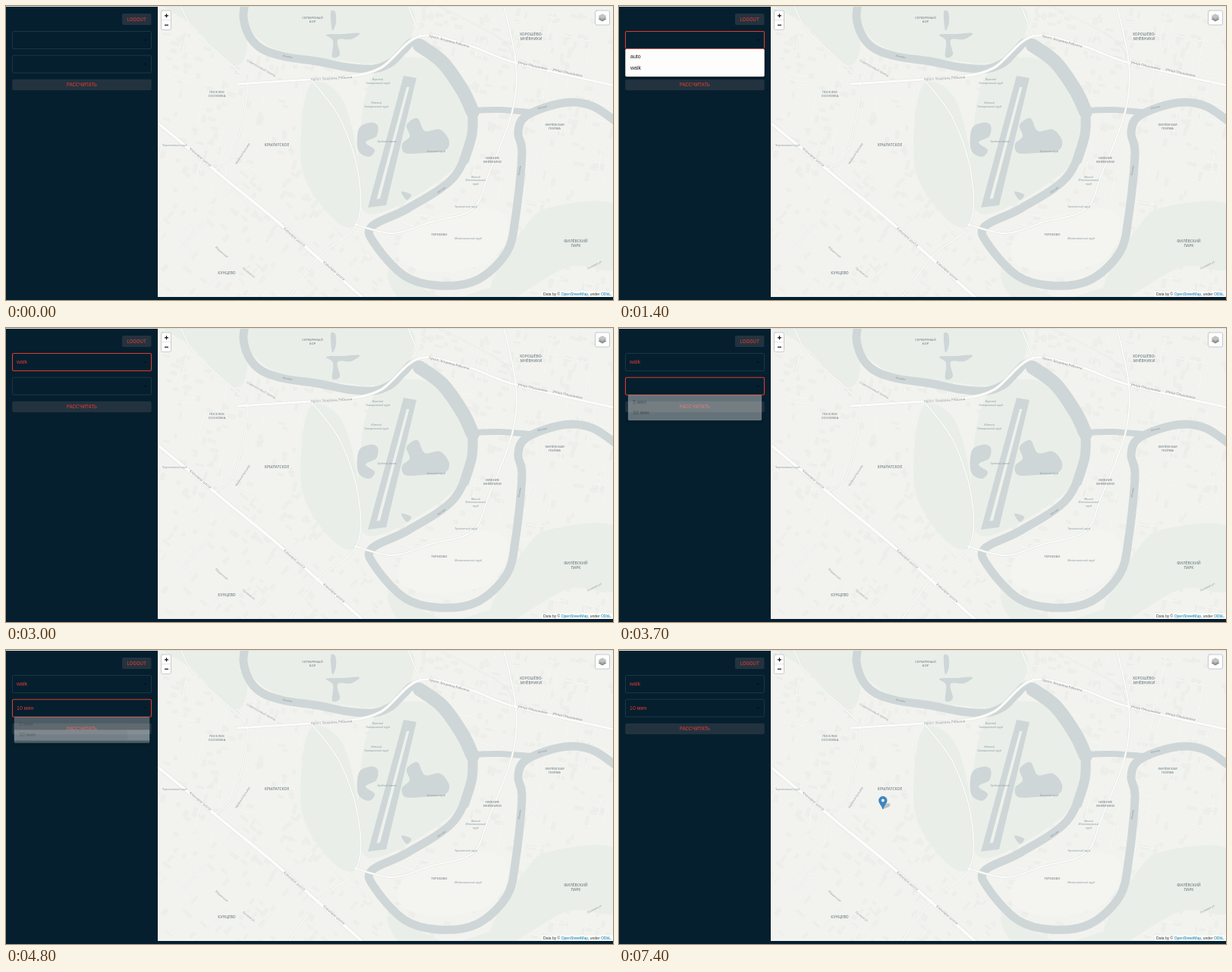
Write an HTML page with a canvas that moves like this. It is 800 by 388 pixels and loops after 8000 ms.

```html
<!DOCTYPE html>
<html lang="ru">
<head>
<meta charset="utf-8">
<title>Карта доступности</title>
<style>
html, body { margin: 0; width: 100%; height: 100%; overflow: hidden; background: #051f2e; }
canvas { display: block; width: 800px; height: 388px; }
</style>
</head>
<body>
<canvas id="stage"></canvas>
<script>
const W = 800, H = 388, LOOP = 8000, STEP = 100;
const LAND = '#f2f3ef', GREEN = '#e9efe8', WATER = '#cfd6d7', CASING = '#e0e3df', ROAD = '#fcfcfa';
const DARK = '#051f2e', RED = '#dc3a31', BUTTON = '#22333f';
const SANS = '7px "Liberation Sans", Arial, sans-serif', CAPS = '500 6px Inter, sans-serif', MAP = '"Open Sans", sans-serif';

const dpr = window.devicePixelRatio || 1;
function setup(canvas) {
  canvas.width = W * dpr;
  canvas.height = H * dpr;
  const c = canvas.getContext('2d');
  c.scale(dpr, dpr);
  return c;
}
const ctx = setup(document.getElementById('stage'));
const mapCanvas = document.createElement('canvas');
const map = setup(mapCanvas);

let seed = 11;
const rnd = () => (seed = (seed * 16807) % 2147483647) / 2147483647;
const clamp = x => Math.max(0, Math.min(1, x));

// Standard material curve, cubic-bezier(.4, 0, .2, 1)
function ease(x) {
  x = clamp(x);
  let lo = 0, hi = 1, s = 0.5;
  for (let i = 0; i < 18; i++) {
    s = (lo + hi) / 2;
    if (1.2 * s * (1 - s) ** 2 + 0.6 * s * s * (1 - s) + s ** 3 < x) lo = s; else hi = s;
  }
  return 3 * s * s * (1 - s) + s ** 3;
}

function text(c, str, x, y, font, color, align = 'left', rot = 0) {
  c.save();
  c.translate(x, y);
  c.rotate(rot * Math.PI / 180);
  c.font = font;
  c.fillStyle = color;
  c.textAlign = align;
  c.textBaseline = 'middle';
  c.fillText(str, 0, 0);
  c.restore();
}

function box(c, x, y, w, h, r, fill, line, lw = 1) {
  c.beginPath();
  c.roundRect(x, y, w, h, r);
  if (fill) { c.fillStyle = fill; c.fill(); }
  if (line) { c.strokeStyle = line; c.lineWidth = lw; c.stroke(); }
}

// ---- map ----

const points = s => s.split(' ').map(p => p.split(',').map(Number));

// Smooth curve through every point
function trace(s, closed) {
  const p = points(s), n = p.length;
  const at = i => closed ? p[(i + n) % n] : p[Math.max(0, Math.min(n - 1, i))];
  const handle = (a, b, c, k) => [0, 1].map(j => a[j] + (c[j] - b[j]) * k / 6);
  map.beginPath();
  map.moveTo(...p[0]);
  for (let i = 0; i < (closed ? n : n - 1); i++) {
    const a = at(i), b = at(i + 1);
    map.bezierCurveTo(...handle(a, at(i - 1), b, 1), ...handle(b, a, at(i + 2), -1), ...b);
  }
}
function area(s, color) {
  trace(s, true);
  map.fillStyle = color;
  map.fill();
}
function line(s, color, width) {
  trace(s);
  map.strokeStyle = color;
  map.lineWidth = width;
  map.stroke();
}
function poly(s, color) {
  map.beginPath();
  points(s).forEach(p => map.lineTo(...p));
  map.fillStyle = color;
  map.fill();
}

// Blocks and lanes follow the slant of their district
function scatter(n, paint) {
  for (let i = 0; i < n; i++) {
    const x = 200 + rnd() * 600, y = rnd() * 384;
    const slant = x > 500 ? 12 : y > 210 ? 41 : 14;
    map.save();
    map.translate(x, y);
    map.rotate((slant + (rnd() < 0.5 ? 90 : 0)) * Math.PI / 180);
    paint();
    map.restore();
  }
}
function block() {
  map.fillStyle = '#eeefeb';
  map.strokeStyle = '#e5e7e3';
  map.lineWidth = 0.4;
  map.beginPath();
  map.rect(0, 0, 4 + rnd() * 8, 2 + rnd() * 3);
  map.fill();
  map.stroke();
}
function lane() {
  const length = 25 + rnd() * 45;
  for (const [color, width] of [['#e6e8e4', 1.5], [ROAD, 0.9]]) {
    map.strokeStyle = color;
    map.lineWidth = width;
    map.beginPath();
    map.moveTo(0, 0);
    map.quadraticCurveTo(length / 2, 4, length, 0);
    map.stroke();
  }
}

function drawParks() {
  [
    '322,-5 515,-5 535,35 505,72 440,72 345,52',
    '205,-5 300,-5 318,50 300,78 245,25',
    '400,105 440,118 462,190 466,280 440,288 400,240 388,190',
    '485,90 560,72 608,150 590,215 480,275 465,200',
    '685,290 720,265 805,264 805,345 740,345 650,395 640,365',
    '505,350 580,385 640,372 620,398 530,395'
  ].forEach(s => area(s, GREEN));
  area('525,300 570,278 640,268 662,290 640,335 570,352 520,335', '#f4f4f0');
}

function drawWater() {
  const river = '316,-8 313,15 321,40 338,57 368,67 410,73 450,81 485,83 508,74 524,58 540,48 575,74 602,112 615,142';
  const bend = '615,142 614,170 590,226 530,267 482,291 486,314 525,356 570,369 620,362 660,325 672,275 680,195 675,168 682,148 710,134 745,127 775,133 806,154';
  line(river, WATER, 11);
  line('545,52 575,74 602,112 615,140', WATER, 18);
  line('615,142 614,170 604,203', WATER, 13);
  line(bend, WATER, 11);
  line('612,138 650,137 690,140', WATER, 8);

  [
    '422,38 445,37 466,36 455,44 437,45 440,64 430,67 431,46',
    '428,8 434,8 435,22 430,32',
    '465,162 480,154 490,158 488,172 474,180 486,190 478,199 464,190',
    '528,157 542,148 552,165 572,163 584,178 578,191 550,194 526,194 522,182 532,172',
    '521,245 534,249 528,256'
  ].forEach(s => area(s, WATER));

  poly('524,92 541,95 501,263 477,266', WATER);
  poly('528,107 531.5,107 493,254 488.5,255', '#eef1ec');
}

function drawRoads() {
  const roads = [
    ['196,151 290,229 350,278 412,333 480,394', 5],
    ['305,103 400,97 452,93 495,81 545,40 610,52 672,75 806,106', 4],
    ['228,-5 250,35 300,80 318,110 300,195 275,215', 2.4],
    ['402,97 440,148 464,220 462,288 412,331 368,392', 2.6],
    ['460,288 510,300 560,285 615,268 636,222 667,140 672,75 655,-5', 3],
    ['528,-5 546,40', 2.6],
    ['560,-5 650,42 672,75', 2]
  ];
  roads.forEach(([s, w]) => line(s, CASING, w));
  roads.forEach(([s, w]) => line(s, ROAD, w - 1));
}

// "|" splits a name over centred lines
function drawNames(size, color, style, names) {
  for (const [name, x, y, rot] of names) {
    name.split('|').forEach((s, i, all) =>
      text(map, s, x, y + (i - (all.length - 1) / 2) * size * 1.2, `${style} ${size}px ${MAP}`, color, 'center', rot));
  }
}

function drawLabels() {
  drawNames(4.1, '#7f8a90', '600', [
    ['СЕРЕБРЯНЫЙ|БОР', 404, 18], ['ПОСЕЛОК|СОСНОВКА', 278, 116.5], ['ТЕРЕХОВО', 571, 302],
    ['НИЖНИЕ|МНЁВНИКИ', 641, 203], ['ФИЛЁВСКАЯ|ПОЙМА', 723, 159.5]
  ]);
  drawNames(4.9, '#7b868c', '600', [
    ['ХОРОШЁВО-|МНЁВНИКИ', 692, 41], ['КРЫЛАТСКОЕ', 357, 183.5], ['КУНЦЕВО', 291, 352.5], ['ФИЛЁВСКИЙ|ПАРК', 751, 314]
  ]);
  drawNames(3.7, '#84969f', 'italic', [
    ['Верхний|Татаровский пруд', 490, 99.5], ['Южный|Татаровский пруд', 488, 130.5], ['Гребной канал', 502, 179.5],
    ['Большой пруд', 567, 192], ['Малый|Мнёвниковский|пруд', 619, 230.5], ['Тереховский пруд', 606, 265],
    ['Мнёвниковский пруд', 609, 307], ['Черепковский пруд', 222, 184.5],
    ['Москва', 371, 67, 10], ['Москва', 707, 134, -14], ['Москва', 574, 243, -36], ['Москва', 677, 217, -80]
  ]);
  drawNames(4.5, '#858b8e', '', [
    ['просп. Боцмана Рябкина', 429, 95.5, -3], ['просп. Боцмана Рябкина', 584, 46.5, 15],
    ['улица Ольшаники', 694, 79, 13], ['улица Ольшаники', 740, 88, 13],
    ['Кленовое шоссе', 256, 200, 40], ['Кленовое шоссе', 380, 305, 41], ['Кленовое шоссе', 432, 350, 41]
  ]);
  drawNames(3.8, '#92989a', '', [
    ['Старососновый проезд', 336, 82, 29], ['Хвойный бульвар', 312, 195, -57],
    ['Рощинская', 284, 325, 40], ['Луговая ул.', 320, 352, 38], ['Полевая ул.', 776, 342, -28]
  ]);
}

function drawControls() {
  box(map, 204.5, 6, 13, 25.5, 2, '#fff', '#c3c6c5', 0.9);
  map.fillStyle = '#ccc';
  map.fillRect(205, 18.5, 12, 0.5);
  map.fillStyle = '#111';
  map.fillRect(209, 12.2, 5, 1.2);
  map.fillRect(210.9, 10.3, 1.2, 5);
  map.fillRect(209, 24.6, 5, 1.2);

  box(map, 776.5, 6, 19, 19, 2, '#fff', '#bfc3c2', 0.9);
  ['#8b8e8e', '#a9acac', '#c2c4c4'].forEach((color, i) => {
    const y = 17.2 - i * 2;
    poly(`780.5,${y} 786,${y - 3} 791.5,${y} 786,${y + 3.2}`, color);
  });

  map.fillStyle = 'rgba(255,255,255,.7)';
  map.fillRect(706, 376.5, 94, 8);
  const font = SANS.replace('7px', '5px');
  let x = 708;
  ['Data by © ', 'OpenStreetMap', ', under ', 'ODbL.'].forEach((s, i) => {
    text(map, s, x, 380.6, font, i % 2 ? '#0078a8' : '#333');
    map.font = font;
    x += map.measureText(s).width;
  });
}

function drawMap() {
  map.fillStyle = LAND;
  map.fillRect(200, 0, 600, H);
  map.lineCap = map.lineJoin = 'round';
  scatter(620, block);
  scatter(150, lane);
  drawParks();
  drawWater();
  drawRoads();
  drawLabels();
  drawControls();
}

// ---- panel ----

function select(y, value, focus) {
  box(ctx, 8.5, y, 183, 23, 1.5, null, focus ? RED : '#203d4a', focus ? 1.1 : 0.8);
  text(ctx, value, 14, y + 11.7, SANS, RED);
  ctx.fillStyle = '#02121c';
  ctx.beginPath();
  ctx.moveTo(181, y + 10.5);
  ctx.lineTo(185.5, y + 10.5);
  ctx.lineTo(183.2, y + 13);
  ctx.fill();
}

function button(label, x, y, w, h) {
  box(ctx, x, y, w, h, 1.8, BUTTON);
  text(ctx, label, x + w / 2, y + h / 2 + 0.3, CAPS, RED, 'center');
}

const menus = [
  { y: 56.7, items: ['auto', 'walk'], open: 814, hover: [1900, 2300], press: 2585, close: 2700, x: 41 },
  { y: 88.3, items: ['5 мин', '10 мин'], open: 3614, hover: [Infinity, 4100], press: 4518, close: 4700, x: 43 }
];

function ripple(x, y, age) {
  ctx.save();
  ctx.beginPath();
  ctx.rect(8.3, y, 183.4, 15);
  ctx.clip();
  ctx.fillStyle = 'rgba(0,0,0,.14)';
  ctx.beginPath();
  ctx.arc(x, y + 7.3, 150 * ease(age / 550), 0, 7);
  ctx.fill();
  ctx.restore();
}

function drawMenu(t, m) {
  const alpha = ease((t - m.open - 15) / 230) * (1 - ease((t - m.close) / 220));
  if (alpha <= 0.001) return;
  const s = 0.75 + 0.25 * ease((t - m.open) / 153) * (1 - ease((t - m.close - 73) / 147));

  ctx.save();
  ctx.globalAlpha = alpha;
  ctx.translate(100, m.y);
  ctx.scale(s, s * s);
  ctx.translate(-100, 0);
  ctx.shadowColor = 'rgba(0,0,0,.45)';
  ctx.shadowBlur = 4 * dpr;
  ctx.shadowOffsetY = 1.5 * dpr;
  box(ctx, 8.3, 0, 183.4, 36.5, 1.6, '#fdfdfc');
  ctx.shadowColor = 'transparent';

  const active = t >= m.hover[1] ? 1 : t >= m.hover[0] ? 0 : -1;
  m.items.forEach((name, i) => {
    const y = 3 + 15 * i;
    if (i === active) {
      ctx.fillStyle = t >= m.close ? '#dfe8ec' : '#f3f3f1';
      ctx.fillRect(8.3, y, 183.4, 15);
      if (t > m.press) ripple(m.x, y, t - m.press);
    }
    text(ctx, name, 15, y + 7.6, SANS, '#1b1b1b');
  });
  ctx.restore();
}

function pin(x, y) {
  ctx.save();
  ctx.translate(x, y);
  ctx.fillStyle = 'rgba(60,65,65,.28)';
  ctx.beginPath();
  ctx.moveTo(0, 0);
  ctx.quadraticCurveTo(2, -6, 7, -8);
  ctx.quadraticCurveTo(12, -7, 8, -3);
  ctx.fill();
  ctx.beginPath();
  ctx.moveTo(0, 0);
  ctx.bezierCurveTo(-1.5, -5, -5.3, -7.5, -5.3, -11.5);
  ctx.arc(0, -11.5, 5.3, Math.PI, 0);
  ctx.bezierCurveTo(5.3, -7.5, 1.5, -5, 0, 0);
  ctx.fillStyle = '#3d87c5';
  ctx.fill();
  ctx.strokeStyle = '#2e6c9f';
  ctx.lineWidth = 0.6;
  ctx.stroke();
  ctx.fillStyle = '#fff';
  ctx.beginPath();
  ctx.arc(0, -11.5, 1.9, 0, 7);
  ctx.fill();
  ctx.restore();
}

function draw(t) {
  ctx.drawImage(mapCanvas, 0, 0, W, H);
  ctx.fillStyle = DARK;
  ctx.fillRect(0, 0, 200, H);
  ctx.fillRect(0, 384, W, 4);
  ctx.fillStyle = '#dfe3e2';
  ctx.fillRect(0, 0, W, 1);

  button('LOGOUT', 153, 10, 38.5, 15);
  select(33.5, t >= 2700 ? 'walk' : '', t >= 800 && t < 3600);
  select(65.2, t >= 4700 ? '10 мин' : '', t >= 3600 && t < 7300);
  button('РАССЧИТАТЬ', 8.3, 96.7, 183.4, 14.6);

  menus.forEach(m => drawMenu(t, m));
  if (t >= 7300) pin(347.8, 210);
}

drawMap();
const start = performance.now();
function tick() {
  const t = (performance.now() - start) % LOOP;
  draw(Math.floor(t / STEP) * STEP);
  requestAnimationFrame(tick);
}
tick();
</script>
</body>
</html>
```
